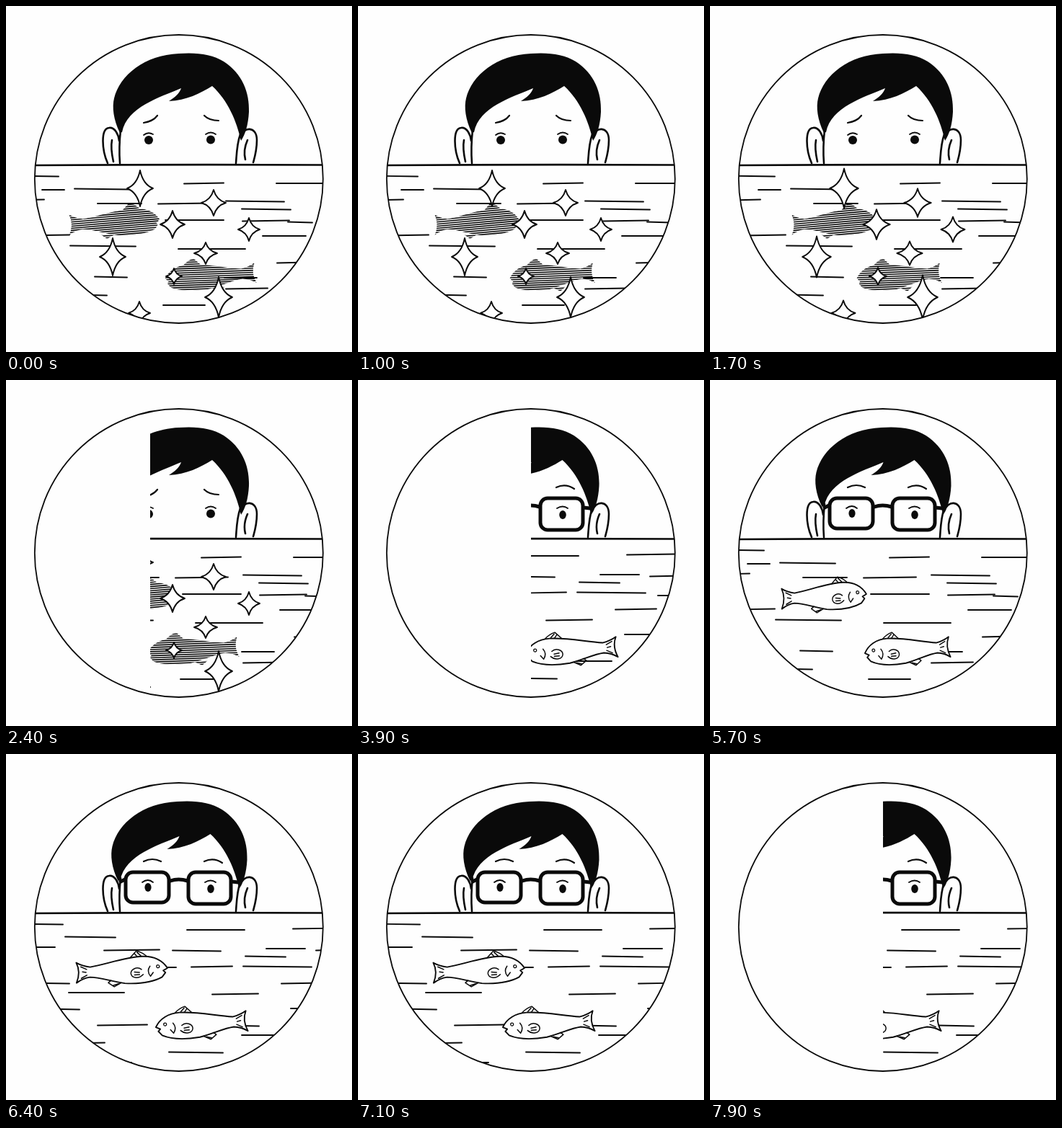
An HTML page with a canvas for the animation above (8000 ms loop, 480 by 480 pixels).

```html
<!DOCTYPE html>
<html>
<head>
<meta charset="utf-8">
<style>
html, body { margin: 0; width: 100%; height: 100%; overflow: hidden; background: #fefefe; }
canvas { display: block; }
</style>
</head>
<body>
<canvas id="stage" width="480" height="480"></canvas>
<script>
const ctx = document.getElementById('stage').getContext('2d');
const INK = '#0a0a0a', PAPER = '#fefefe';

// Water lines: x start, x end, y
const RIPPLES_A = [
  [5,75,236], [377,450,246], [249,304,246], [97,174,254], [52,83,255], [10,55,269],
  [307,388,271], [129,190,274], [213,286,274], [329,397,282], [223,304,297], [330,395,298],
  [393,427,300], [358,418,319], [30,90,318], [91,182,333], [241,334,337], [378,420,356],
  [125,170,376], [305,350,377], [307,365,392], [95,142,401], [220,278,415]
];
const RIPPLES_B = [
  [10,86,236], [258,338,244], [405,473,242], [89,159,254], [10,75,268], [143,220,272],
  [238,305,273], [368,422,270], [437,480,272], [339,395,281], [170,243,296], [264,321,295],
  [336,431,295], [448,480,299], [389,446,318], [25,95,318], [94,171,331], [293,357,333],
  [60,109,354], [402,436,353], [134,203,376], [309,358,377], [334,384,390], [90,144,401],
  [233,308,414], [150,181,428]
];
// Sparkles: centre, half width, half height
const SPARKLES = [
  [186,253,18,25], [288,273,17,18], [231,303,17,19], [337,310,15,16], [148,348,18,26],
  [277,343,16,15], [233,375,11,11], [295,404,19,28], [185,426,15,16]
];

const HAIR = new Path2D('M158 176C149 158 147 140 150 128C158 96 192 68 240 66C264 64 286 67 302 77C328 94 338 120 337 147C336 165 332 178 326 187C320 160 308 131 286 111C270 121 250 131 226 132C234 127 241 121 243 114C213 127 168 140 161 175Z');
const EARS = new Path2D('M141 218C133 200 131 170 143 169C151 168 156 178 157 187M147 186C145 196 147 207 149 216M159 172C157 190 157 205 158 218M325 182C329 167 348 166 348 186C348 200 345 210 343 217M335 186C331 195 330 205 332 213M325 178C320 192 320 206 319 218');
const SAD_BROWS = new Path2D('M191 162Q204 160 210 152M275 152Q282 159 295 159');
const SAD_LIDS = new Path2D('M191 179Q197 174 204 178M277 178Q284 173 291 178');
const CALM_BROWS = new Path2D('M191 149Q203 143 215 149M275 149Q288 143 300 151');
const CALM_LIDS = new Path2D('M189 178Q197 172 204 178M276 178Q284 173 291 178');

// Fish facing left, mouth at the origin
const FISH = new Path2D('M0 -1C6 -12 18 -19 34 -19C58 -19 84 -11 107 -8Q118 -10 126 -15Q120 -2 127 13Q118 7 108 6C94 7 80 13 60 17C40 19 20 17 8 11L3 5L6 2Z');
const FINS = new Path2D('M28 -19Q34 -25 42 -27L51 -18M36 -20L41 -25M41 -19L45 -24M65 16L75 21L83 15L79 12M69 17L76 19M36 -1C42 -6 51 -2 51 4C50 11 40 12 34 6M39 3L46 2M39 6L46 6M24 -5C28 0 27 5 24 9M20 4L24 9M112 -5L120 -9M113 -1L118 -2M112 3L120 7');

function stroke(path, width) {
  ctx.lineWidth = width;
  ctx.stroke(path);
}

function oval(x, y, rx, ry) {
  ctx.beginPath();
  ctx.ellipse(x, y, rx, ry, 0, 0, Math.PI * 2);
  ctx.fill();
}

function lens(x, y, w, h) {
  ctx.beginPath();
  ctx.roundRect(x, y, w, h, 10);
  ctx.stroke();
}

function face(glasses) {
  ctx.save();
  if (glasses) ctx.translate(-2.5, 0);
  ctx.fill(HAIR);
  ctx.restore();
  stroke(EARS, 2.6);
  stroke(glasses ? CALM_BROWS : SAD_BROWS, 2.2);
  stroke(glasses ? CALM_LIDS : SAD_LIDS, 1.8);
  if (glasses) {
    oval(197, 185, 4.6, 6);
    oval(284, 187, 4.8, 6);
    ctx.lineWidth = 5;
    lens(166, 164, 60, 42);
    lens(253, 164, 59, 44);
    stroke(new Path2D('M228 176Q239 172 252 176M165 174L159 177M313 177L322 178'), 5);
  } else {
    oval(198, 186, 6, 6);
    oval(284, 185.5, 6, 6);
  }
}

function ripples(list, shift) {
  ctx.lineWidth = 1.9;
  list.forEach(([a, b, y], i) => {
    const tilt = i % 3 * 0.5 - 0.5;
    ctx.beginPath();
    ctx.moveTo(a + shift, y + tilt);
    ctx.lineTo(b + shift, y - tilt);
    ctx.stroke();
  });
}

function fish(x, y, flip, stretch, hatched) {
  ctx.save();
  ctx.translate(x, y);
  ctx.scale(flip * stretch, 1);
  ctx.rotate((flip < 0 ? 3 : -4) * Math.PI / 180);
  if (hatched) {
    const shape = new Path2D(FISH);
    shape.addPath(new Path2D('M28 -19Q34 -25 42 -27L51 -18ZM65 16L75 21L83 15Z'));
    ctx.clip(shape);
    ctx.lineWidth = 1.6;
    for (let h = -28; h < 24; h += 2.9) {
      ctx.beginPath();
      ctx.moveTo(1 + h * h * 7 % 5, h - 1);
      ctx.lineTo(128 - h * h * 3 % 6, h + 3);
      ctx.stroke();
    }
  } else {
    ctx.fillStyle = PAPER;
    ctx.fill(FISH);
    ctx.fillStyle = INK;
    stroke(FISH, 1.9);
    stroke(FINS, 1.5);
    ctx.lineWidth = 1.3;
    ctx.beginPath();
    ctx.arc(13, -4, 2, 0, Math.PI * 2);
    ctx.stroke();
  }
  ctx.restore();
}

function sparkle(x, y, w, h) {
  const p = new Path2D();
  const k = 0.22;
  p.moveTo(x, y - h);
  [[1, -1, w, 0], [1, 1, 0, h], [-1, 1, -w, 0], [-1, -1, 0, -h]].forEach(([sx, sy, dx, dy]) =>
    p.quadraticCurveTo(x + sx * w * k, y + sy * h * k, x + dx, y + dy));
  p.closePath();
  ctx.fillStyle = PAPER;
  ctx.fill(p);
  ctx.fillStyle = INK;
  stroke(p, 1.9);
}

// Left edge of the visible part; everything before it is wiped away
function wipeEdge(t) {
  if (t < 35) return 40 + Math.max(0, t - 20) * 40;
  if (t < 74) return Math.max(40, 400 - (t - 35) * 40);
  return 40 + (t - 74) * 40;
}

function draw(t) {
  const dark = t < 35;
  const longPose = (t + 1) % 4 < 2;
  const stretch = longPose ? 1 : 0.93;
  ctx.fillStyle = PAPER;
  ctx.fillRect(0, 0, 480, 480);
  ctx.fillStyle = ctx.strokeStyle = INK;
  ctx.lineCap = ctx.lineJoin = 'round';

  ctx.save();
  ctx.beginPath();
  ctx.rect(wipeEdge(t) - (wipeEdge(t) === 40 ? 5 : 0), 0, 480, 480);
  ctx.clip();
  ctx.beginPath();
  ctx.arc(239.8, 240, 200, 0, Math.PI * 2);
  ctx.clip();
  face(!dark);
  stroke(new Path2D('M38 221Q240 219.5 442 220.5'), 2.7);
  if (dark) ripples(RIPPLES_A, t - 2);
  else if (longPose) ripples(RIPPLES_B, t - 71);
  else ripples(RIPPLES_A, t - 57);
  fish(t + (dark ? 214 : 160), 298, -1, stretch, dark);
  fish((dark ? 220 : 272) - t, 380, 1, stretch, dark);
  if (dark) {
    const grow = t % 2 ? 1.1 : 1;
    SPARKLES.forEach(([x, y, w, h]) => sparkle(x, y, w * grow, h * grow));
  }
  ctx.restore();

  ctx.lineWidth = 1.8;
  ctx.beginPath();
  ctx.arc(239.8, 240, 200, 0, Math.PI * 2);
  ctx.stroke();
}

function frame() {
  draw(Math.floor(performance.now() % 8000 / 100));
  requestAnimationFrame(frame);
}
frame();
</script>
</body>
</html>
```
